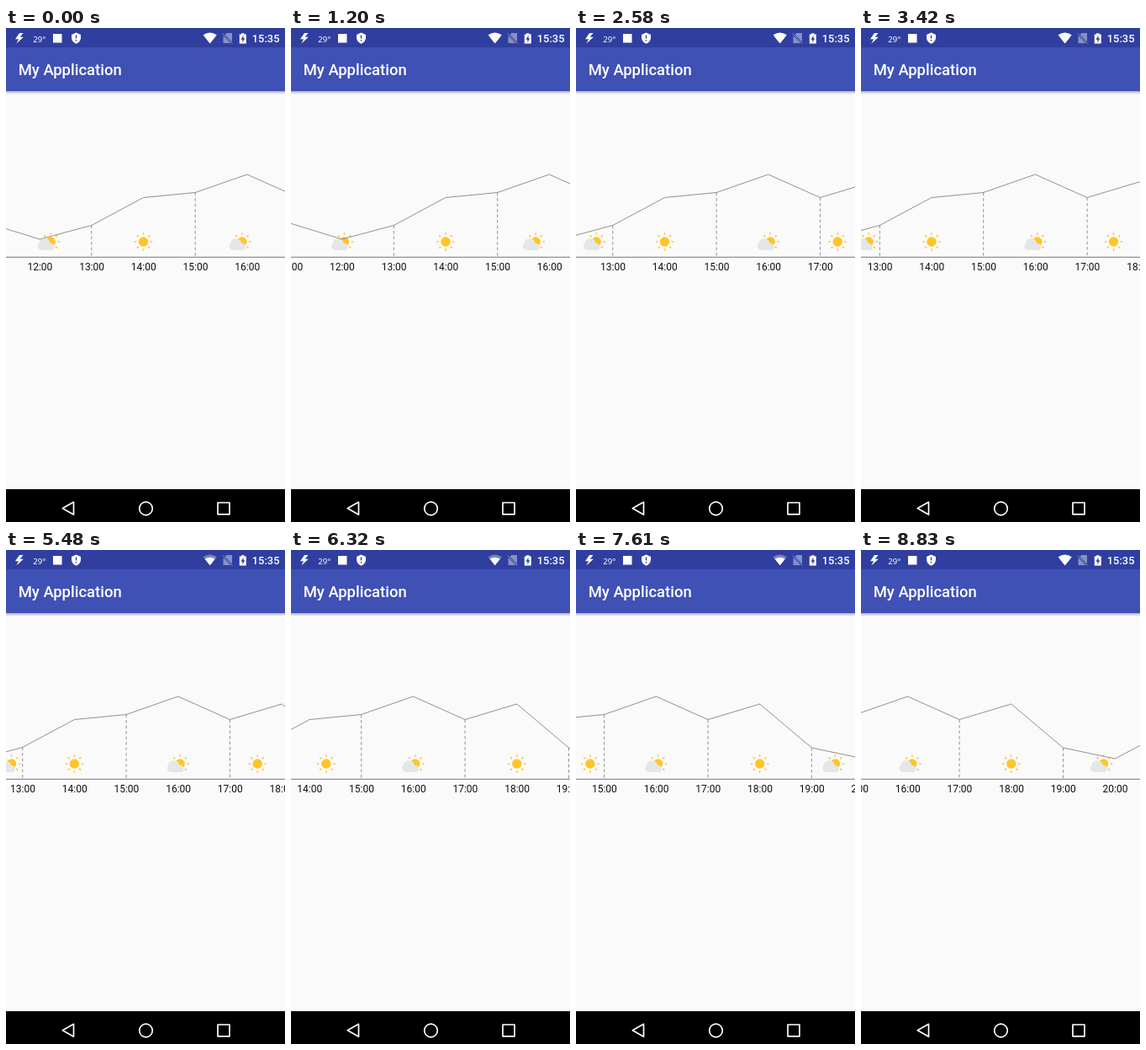
Write an HTML page that moves like this. It is 332 px wide and 587 px high and loops after 8930 ms.

```html
<!DOCTYPE html>
<html lang="en">
<head>
<meta charset="utf-8">
<title>Hourly weather chart</title>
<style>
  html, body { margin: 0; width: 100%; height: 100%; overflow: hidden; background: #fafafa; }
  svg { display: block; width: 100vw; height: 100vh; }
  text { font-family: Roboto, sans-serif; }
  .bar { fill: #fff; font-weight: 500; }
  .hour { font-size: 12px; text-anchor: middle; fill: #111; }
  .thin { fill: none; stroke: #858585; stroke-width: .9; }
  .dash { stroke-dasharray: 3.7 2.8; }
  .nav { fill: none; stroke: #fff; stroke-width: 1.7; stroke-linejoin: round; }
</style>
</head>
<body>
<svg viewBox="0 0 332 587">
  <defs>
    <linearGradient id="shade" x2="0" y2="1">
      <stop stop-color="#000" stop-opacity=".28"/>
      <stop offset="1" stop-color="#000" stop-opacity="0"/>
    </linearGradient>
  </defs>
  <rect width="332" height="587" fill="#fafafa"/>

  <g id="icons"></g>
  <g id="chart"></g>
  <path d="M0 272.3H332" stroke="#777" stroke-width="1"/>

  <rect y="75" width="332" height="4" fill="url(#shade)"/>
  <rect width="332" height="75" fill="#3f51b5"/>
  <rect width="332" height="23" fill="#303f9f"/>
  <text class="bar" x="14.7" y="56" font-size="18.44">My Application</text>

  <g fill="#fff">
    <path d="M16 6L11 13.2H15L12.3 18.6L20.8 10.8H16.6L20.5 6Z"/>
    <text x="32.3" y="16.5" font-size="9.5" style="font-family:'Noto Sans',sans-serif;font-stretch:condensed">29°</text>
    <rect x="56" y="7" width="10.5" height="10.5"/>
    <path d="M83.500 5.500L89 8V12Q88.500 16.500 83.500 18.700Q78.500 16.500 78 12V8Z"/>
    <path d="M83.500 8.500V12.500M83.500 14V15.500" stroke="#303f9f" stroke-width="1.400"/>
    <path id="wifiFull" d="M242.700 18.300L234.600 8.200Q242.700 2.600 250.800 8.200Z"/>
    <path id="wifiCore" d="M242.700 18.300L236.600 10.700Q242.700 6.600 248.800 10.700Z"/>
    <g opacity=".42">
      <path d="M262.500 6H269V18H258.500V10Z"/>
      <path d="M257.500 6.500L269.500 18.500" stroke="#303f9f" stroke-width="2.200"/>
      <path d="M257.500 6.500L269.500 18.500" stroke="#fff" stroke-width="1"/>
    </g>
    <path d="M277.800 7.500H280V6.200H283.500V7.500H285.800V18.600H277.800Z"/>
    <path d="M282.500 8.800L279.500 13.700H281.400V17.200L284.300 12.200H282.500Z" fill="#303f9f"/>
  </g>
  <text class="bar" x="292.800" y="17" font-size="12.900">15:35</text>

  <rect y="548" width="332" height="39" fill="#000"/>
  <path class="nav" d="M80.500 563.300V578.300L67.300 570.800Z"/>
  <circle class="nav" cx="166.500" cy="571" r="7.800"/>
  <rect class="nav" x="252" y="564" width="14" height="13.800"/>
</svg>
<script>
const LOOP = 8930, WIDTH = 332, HOUR = 61.7, AXIS = 272, EDGE = 15.5;
const FIRST = 10;
const heights = [238, 232, 251, 234.5, 201.5, 195.5, 174, 201.5, 183, 235, 248, 215.5, 205];

// Time and screen x of the 14:00 mark
const knots = [[0, 163.5], [1200, 184], [1920, 127], [3420, 84],
               [5340, 84], [6320, 22], [7610, -28.1], [8430, -68], [LOOP, -68]];

// Screen refreshes: first, last, count
const bursts = [[120, 1080, 8], [1200, 1920, 6], [2070, 2190, 2], [2310, 3270, 8], [3420, 3420, 1],
                [5480, 6320, 7], [6440, 6440, 1], [6590, 7610, 9], [7730, 8430, 6]];
const refreshes = [0];
for (const [from, to, count] of bursts)
  for (let i = 0; i < count; i++) refreshes.push(from + (to - from) * i / Math.max(1, count - 1));

const byId = id => document.getElementById(id);
function add(parent, tag, attrs, text = '') {
  const node = document.createElementNS('http://www.w3.org/2000/svg', tag);
  for (const key in attrs) node.setAttribute(key, attrs[key]);
  node.textContent = text;
  return parent.appendChild(node);
}

const chart = byId('chart');
const hourX = hour => (hour - 14) * HOUR;
add(chart, 'polyline', { class: 'thin', points: heights.map((y, i) => [hourX(FIRST + i), y]).join(' ') });
heights.forEach((y, i) => {
  const hour = FIRST + i, x = hourX(hour);
  if (hour % 2) add(chart, 'path', { class: 'thin dash', d: `M${x} ${y}V${AXIS}` });
  add(chart, 'text', { class: 'hour', x: x + .3, y: 288 }, hour + ':00');
});

function addSun(parent, x, rays) {
  const sun = add(parent, 'g', { transform: `translate(${x} 0)`, fill: '#ffc42a', stroke: '#ffc42a' });
  add(sun, 'circle', { r: 5.7, stroke: 'none' });
  for (const ray of rays)
    add(sun, 'path', { d: 'M8.3 0H10.8', 'stroke-width': 1.5, transform: `rotate(${ray * 45})` });
}
function addIcon(cloudy) {
  const icon = add(byId('icons'), 'g', {});
  if (!cloudy) {
    addSun(icon, 0, [0, 1, 2, 3, 4, 5, 6, 7]);
    return icon;
  }
  addSun(icon, 2.3, [-3, -2, -1, 0, 1]);
  add(icon, 'path', {
    fill: '#e4e7e8',
    d: 'M-8.2 10A4.8 4.8 0 0 1-11.6 1.8A6.8 6.8 0 0 1 1.7 1.7A4.5 4.5 0 0 1 4.5 10Z'
  });
  return icon;
}
const spans = [11, 13, 15, 17, 19].map((hour, i) => ({ hour, icon: addIcon(i % 2 === 0) }));

const slope = i => (knots[i + 1][1] - knots[i][1]) / (knots[i + 1][0] - knots[i][0]);
function tangent(i) {
  if (i === 0 || i === knots.length - 1) return 0;
  const a = slope(i - 1), b = slope(i);
  return a * b > 0 ? 2 * a * b / (a + b) : 0;
}
function scrollAt(t) {
  let i = 0;
  while (i < knots.length - 2 && t >= knots[i + 1][0]) i++;
  const [t0, x0] = knots[i], [t1, x1] = knots[i + 1];
  const d = t1 - t0, u = (t - t0) / d, v = 1 - u;
  return x0 * (1 + 2 * u) * v * v + x1 * u * u * (3 - 2 * u)
    + d * u * v * (tangent(i) * v - tangent(i + 1) * u);
}

function draw(t) {
  const x = scrollAt(refreshes.findLast(r => r <= t + .01));
  chart.setAttribute('transform', `translate(${x} 0)`);
  for (const { hour, icon } of spans) {
    const left = x + hourX(hour), right = left + 2 * HOUR;
    const middle = (Math.max(left, 0) + Math.min(right, WIDTH)) / 2;
    const center = Math.min(Math.max(middle, left + EDGE), right - EDGE);
    icon.setAttribute('transform', `translate(${center} 254)`);
  }
  const weak = t >= 5480 && t < 8830;
  byId('wifiFull').setAttribute('opacity', weak ? .35 : 1);
}

const start = performance.now();
function tick() {
  draw((performance.now() - start) % LOOP);
  requestAnimationFrame(tick);
}
tick();
</script>
</body>
</html>
```
